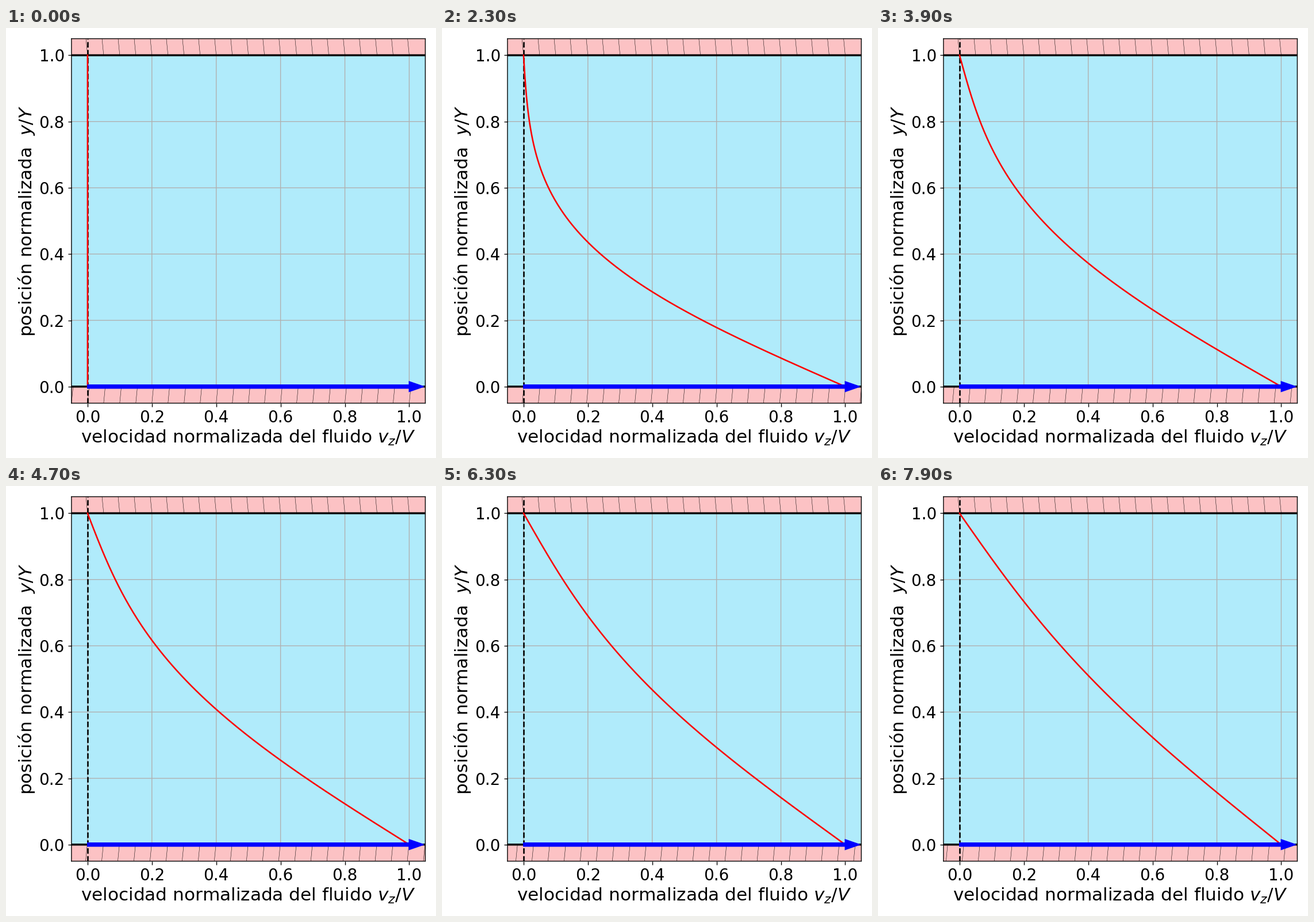
A matplotlib script that plays this animation: 748x748 px, repeating every 8000 ms.

```python
import numpy as np
import matplotlib.pyplot as plt
from matplotlib.animation import FuncAnimation
from matplotlib.collections import LineCollection

SIZE = 748
FRAMES, INTERVAL = 80, 100
DT = 0.5 / 199          # dimensionless time per frame
LO, HI = -0.05, 1.05    # limits of both axes
GAP, LEAN = 0.05, 0.005  # hatch spacing and slant
STEP = 0.002            # travel of the lower wall per frame

y = np.linspace(0, 1, 201)
modes = np.arange(1, 80)[:, None]


def velocity(t):
    """Start-up of plane Couette flow, lower wall moving."""
    if t == 0:
        return np.zeros_like(y)
    k = modes * np.pi
    return 1 - y - (2 / k * np.exp(-k**2 * t) * np.sin(k * y)).sum(axis=0)


def wall_hatch(bottom, shift=0.0):
    x = LO + GAP * np.arange(22) + shift
    if bottom:
        return [[(a, LO), (a + LEAN, 0)] for a in x]
    return [[(a, 1), (a - LEAN, HI)] for a in x]


fig, ax = plt.subplots(figsize=(6, 6), dpi=SIZE / 6)
fig.subplots_adjust(left=113.9 / SIZE, right=729.4 / SIZE,
                    bottom=1 - 652.6 / SIZE, top=1 - 18.6 / SIZE)
ax.set_facecolor("#b0ebfb")
ax.grid(True, snap=False)
ax.spines[:].set_snap(False)
ax.tick_params(labelsize=16)
ax.tick_params(axis="x", pad=2.8)
ax.set_xlabel("velocidad normalizada del fluido $v_z/V$", fontsize=18,
              labelpad=3.2)
ax.set_ylabel("posición normalizada  $y/Y$", fontsize=18, labelpad=2.5)

for low, high, wall in ((LO, 0, 0), (1, HI, 1)):
    ax.axhspan(low, high, facecolor="#fcc2c4", edgecolor="none", zorder=1.7)
    ax.axhline(wall, color="k", lw=2, snap=False)

hatch_style = dict(colors="k", linewidths=0.3, zorder=1.8)
ax.add_collection(LineCollection(wall_hatch(False), **hatch_style),
                  autolim=False)
moving = LineCollection(wall_hatch(True), **hatch_style)
ax.add_collection(moving, autolim=False)

ax.axvline(0, color="k", ls="--", lw=1.5)
profile, = ax.plot(velocity(0), y, color="r", lw=1.5, snap=False)
ax.arrow(0, 0, 1, 0, width=0.01, color="b", zorder=2.4)
ax.set(xlim=(LO, HI), ylim=(LO, HI))


def update(i):
    profile.set_xdata(velocity(i * DT))
    moving.set_segments(wall_hatch(True, STEP * (i % 25)))
    return profile, moving


anim = FuncAnimation(fig, update, frames=FRAMES, interval=INTERVAL,
                     repeat=True, repeat_delay=0)
plt.show()
```
